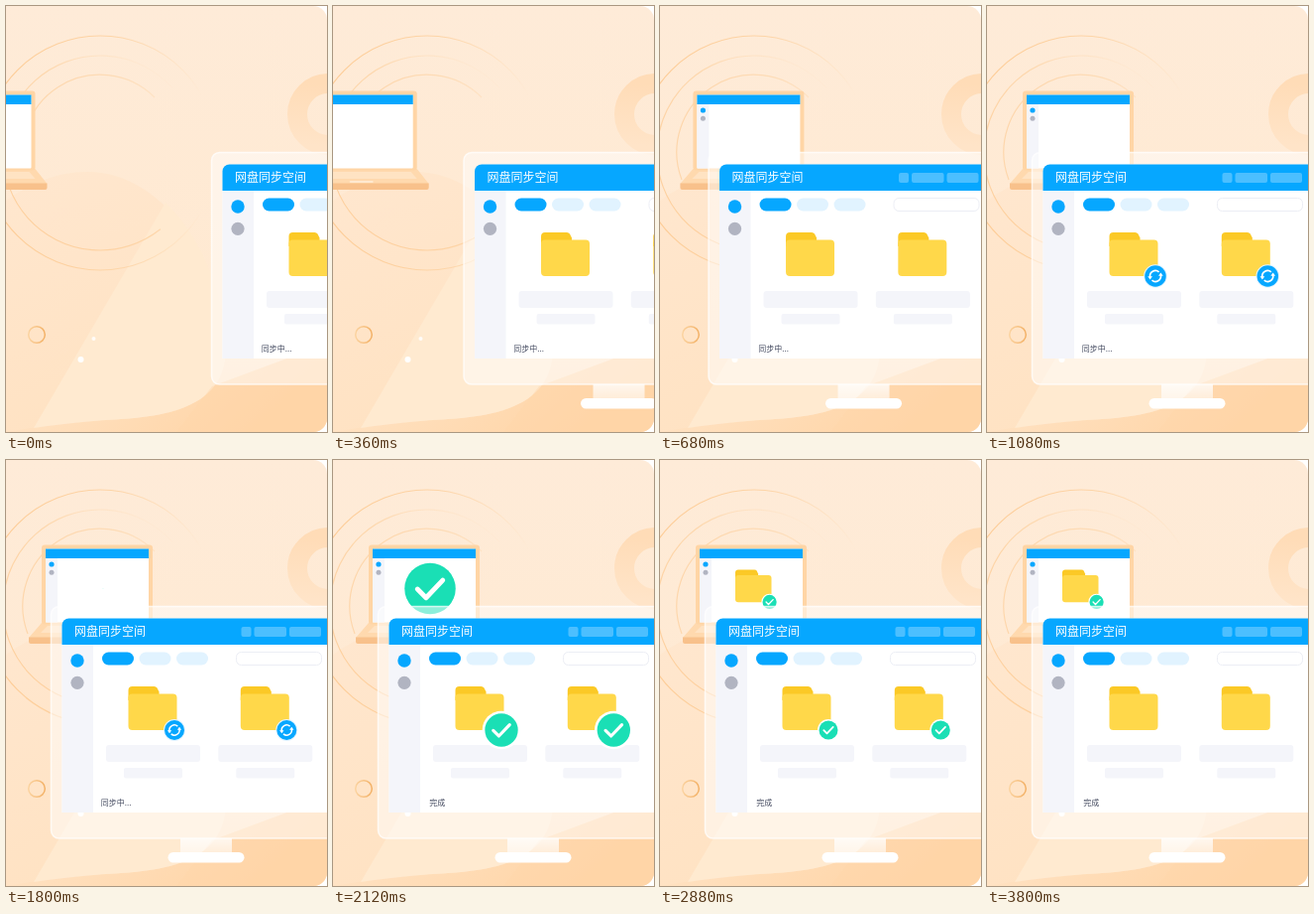
Animation of 324 by 429 pixels, one loop 4000 ms. Source, as an HTML page:

```html
<!DOCTYPE html>
<html lang="zh">
<head>
<meta charset="utf-8">
<style>
  html, body { margin: 0; width: 100%; height: 100%; overflow: hidden; background: #fff; }
  svg { display: block; width: 324px; height: 429px; border-radius: 0 14px 14px 0; }
  text { font-family: "Noto Sans CJK SC", "Noto Sans CJK", sans-serif; font-weight: 500; }
</style>
</head>
<body>
<svg viewBox="0 0 324 429">
  <defs>
    <linearGradient id="sky" x2="0" y2="1">
      <stop stop-color="#feebd8"/><stop offset=".7" stop-color="#ffe9d1"/><stop offset="1" stop-color="#ffdfbd"/>
    </linearGradient>
    <linearGradient id="floor" x2="1" y2=".3">
      <stop stop-color="#ffe6cb"/><stop offset="1" stop-color="#ffd4a5"/>
    </linearGradient>
    <linearGradient id="blob" x2=".4" y2="1">
      <stop stop-color="#ffe7cf"/><stop offset="1" stop-color="#ffe2c2"/>
    </linearGradient>
    <linearGradient id="arc" gradientUnits="userSpaceOnUse" x1="0" x2="198" y1="100" y2="100">
      <stop stop-color="#fdcd98"/><stop offset=".55" stop-color="#fdd5a8"/><stop offset="1" stop-color="#fdd5a8" stop-opacity="0"/>
    </linearGradient>
    <linearGradient id="ring" x1=".3" x2=".2" y2="1">
      <stop stop-color="#ffdcb7"/><stop offset="1" stop-color="#ffe4c8"/>
    </linearGradient>
    <linearGradient id="hoop" x2="1">
      <stop stop-color="#fbd3a0"/><stop offset="1" stop-color="#f3b166"/>
    </linearGradient>
    <linearGradient id="neck" x2="0" y2="1">
      <stop stop-color="#fff" stop-opacity=".8"/><stop offset="1" stop-color="#fff" stop-opacity=".55"/>
    </linearGradient>
    <clipPath id="screen"><path d="M56.5 355V166.500a7 7 0 0 1 7-7H340a7 7 0 0 1 7 7V355z"/></clipPath>

    <g id="folder">
      <path d="M0 14V4a4 4 0 0 1 4-4h22q2 0 3 1.500l2 4V14z" fill="#fbc926"/>
      <rect y="7.500" width="49" height="36.500" rx="4" fill="#ffd84a"/>
    </g>
    <g id="tick">
      <circle r="9.500" fill="#1adfb5"/>
      <path d="M-4.700 .2l3.200 3.200 6.200-6.500" fill="none" stroke="#fff" stroke-width="1.800" stroke-linecap="round" stroke-linejoin="round"/>
    </g>
    <g id="done"><circle r="11" fill="#fff"/><use href="#tick"/></g>
    <g id="syncing">
      <circle r="11" fill="#e2f4ff"/>
      <circle r="10" fill="#06a7ff"/>
      <g id="half">
        <path d="M-5 1A5.100 5.100 0 0 1 3.300-3.900" fill="none" stroke="#fff" stroke-width="1.500"/>
        <path d="M-7.200 .2h4.400L-5 3.300z" fill="#fff"/>
      </g>
      <use href="#half" transform="rotate(180)"/>
    </g>
    <g id="file">
      <use href="#folder" x="123.500" y="228"/>
      <g fill="#f4f5fa">
        <rect x="101" y="287" width="95" height="17" rx="3"/>
        <rect x="119" y="310" width="59" height="10.500" rx="2"/>
      </g>
    </g>
  </defs>

  <!-- backdrop -->
  <rect width="324" height="429" fill="url(#sky)"/>
  <path d="M0 429V426C80 412 170 418 208 383L324 340V429z" fill="url(#floor)"/>
  <path d="M0 196C25 178 52 167 82 167C165 167 222 270 222 345C222 418 130 414 88 418Q45 421 0 429z" fill="url(#blob)"/>
  <path d="M161 198C200 235 222 297 222 345C222 418 130 414 88 418Q55 421 28 425z" fill="#ffead0"/>
  <path d="M208 383L324 340V429H172z" fill="#ffd6a8" opacity=".45"/>
  <g fill="none" stroke="url(#arc)" stroke-width="1.200">
    <circle cx="95" cy="148" r="118"/>
    <circle cx="95" cy="148" r="98" opacity=".85" stroke-dasharray="460 160" stroke-dashoffset="460" transform="rotate(-42 95 148)"/>
    <path d="M22 175A78 78 0 0 1 150 92" opacity=".7"/>
  </g>
  <circle cx="325" cy="109" r="31" fill="none" stroke="url(#ring)" stroke-width="20"/>
  <circle cx="31" cy="331" r="8.300" fill="none" stroke="url(#hoop)" stroke-width="1.500"/>
  <circle cx="75.500" cy="356" r="3" fill="#fff"/>
  <circle cx="88.500" cy="335" r="2" fill="#fff" opacity=".85"/>

  <g id="laptop">
    <path d="M36 164H148L160 179H23z" fill="#ffd9ae"/>
    <path d="M42 167H142L148 174H35z" fill="#ffe3c3"/>
    <rect x="36" y="85.500" width="112" height="80" rx="3" fill="#ffd5a5"/>
    <rect x="40" y="89.500" width="104" height="74" rx="1" fill="#fff"/>
    <rect x="40" y="99" width="12" height="64.500" fill="#f4f5fa"/>
    <rect x="40" y="89.500" width="104" height="9.500" fill="#06a7ff"/>
    <circle cx="46" cy="105" r="2.600" fill="#06a7ff"/>
    <circle cx="46" cy="113.300" r="2.500" fill="#b1b4c1"/>
    <path d="M23 178.500H160V183q0 2-2 2H25q-2 0-2-2z" fill="#f8c18b"/>
    <rect x="80" y="176" width="24" height="2" rx="1" fill="#ffe9d0"/>
    <g id="copy">
      <use href="#folder" transform="translate(-18.300 -16.400) scale(.745)"/>
      <use href="#done" transform="translate(16.300 16) scale(.745)"/>
    </g>
    <use id="bigTick" href="#tick"/>
  </g>

  <g id="monitor">
    <rect x="176" y="381" width="52" height="15" fill="url(#neck)"/>
    <rect x="163.500" y="395" width="77" height="10.500" rx="5.250" fill="#fff"/>
    <rect x="45.500" y="147.500" width="313" height="233.500" rx="8" fill="#fff" fill-opacity=".5" stroke="#fff" stroke-opacity=".75" stroke-width="1.500"/>
    <g clip-path="url(#screen)">
      <rect x="56" y="159" width="291" height="197" fill="#fff"/>
      <rect x="56" y="186" width="32" height="170" fill="#f4f5fa"/>
      <rect x="56" y="159" width="291" height="27" fill="#06a7ff"/>
    </g>
    <text x="69" y="177.300" font-size="12" fill="#fff">网盘同步空间</text>
    <g fill="#fff" opacity=".28">
      <rect x="237.500" y="168" width="10" height="10" rx="2"/>
      <rect x="250.500" y="168" width="32.500" height="10" rx="2"/>
      <rect x="286" y="168" width="32" height="10" rx="2"/>
    </g>
    <circle cx="72" cy="202" r="6.700" fill="#06a7ff"/>
    <circle cx="72" cy="224.300" r="6.600" fill="#b1b4c1"/>
    <rect x="97" y="193.500" width="32" height="13" rx="6.500" fill="#06a7ff"/>
    <g fill="#e1f3ff">
      <rect x="134.500" y="193.500" width="32" height="13" rx="6.500"/>
      <rect x="172" y="193.500" width="32" height="13" rx="6.500"/>
    </g>
    <rect x="232.500" y="193.500" width="86" height="13" rx="5" fill="#fff" stroke="#eceef5"/>
    <use href="#file"/>
    <use href="#file" x="113.300"/>
    <g id="badges">
      <g transform="translate(170 272)"><use class="sync" href="#syncing"/><use class="ok" href="#done"/></g>
      <g transform="translate(283.300 272)"><use class="sync" href="#syncing"/><use class="ok" href="#done"/></g>
    </g>
    <text id="status" y="348.200" font-size="8" fill="#454b60"></text>
  </g>
</svg>
<script>
const $ = id => document.getElementById(id);
const all = name => document.querySelectorAll('.' + name);
const syncs = all('sync'), oks = all('ok');
const span = (t, from, to) => Math.min(1, Math.max(0, (t - from) / (to - from)));

// cubic-bezier(.25, .1, .25, 1)
function ease(x) {
  if (x <= 0 || x >= 1) return x;
  const at = (a, b, s) => 3 * a * s * (1 - s) ** 2 + 3 * b * s * s * (1 - s) + s ** 3;
  let lo = 0, hi = 1;
  for (let i = 0; i < 24; i++) {
    const mid = (lo + hi) / 2;
    if (at(.25, .25, mid) < x) lo = mid; else hi = mid;
  }
  return at(.1, 1, lo);
}

// overshoots by ten percent before settling
const pop = u => u <= 0 ? 0 : 1 + 2.70158 * (u - 1) ** 3 + 1.70158 * (u - 1) ** 2;

function place(el, x, y, scale = 1) {
  el.setAttribute('transform', `translate(${x} ${y}) scale(${scale})`);
  el.style.visibility = scale > .001 ? 'visible' : 'hidden';
}

function draw(t) {
  const away = 1 - ease(span(t, 195, 795));
  place($('laptop'), -118.5 * away, 0);
  place($('monitor'), 162 * away, 0);

  const hit = pop(span(t, 1800, 2320));
  const okScale = hit * (1.6 - .6 * ease(span(t, 2320, 2880)));
  const syncScale = okScale > 1 || t > 2000 ? 0 : pop(span(t, 780, 1200));
  syncs.forEach(el => place(el, 0, 0, syncScale));
  oks.forEach(el => place(el, 0, 0, okScale));
  $('badges').style.display = t < 3800 ? '' : 'none';

  place($('bigTick'), 98, 129.5, 2.47 * hit * (1 - ease(span(t, 2320, 2600))));
  place($('copy'), 94.3, 126.9, ease(span(t, 2520, 2880)));

  const busy = t < 2000;
  $('status').textContent = busy ? '同步中...' : '完成';
  $('status').setAttribute('x', busy ? 95.8 : 97.3);
}

const start = performance.now();
function tick(now) {
  draw(Math.max(0, now - start) % 4000);
  requestAnimationFrame(tick);
}
draw(0);
requestAnimationFrame(tick);
</script>
</body>
</html>
```
